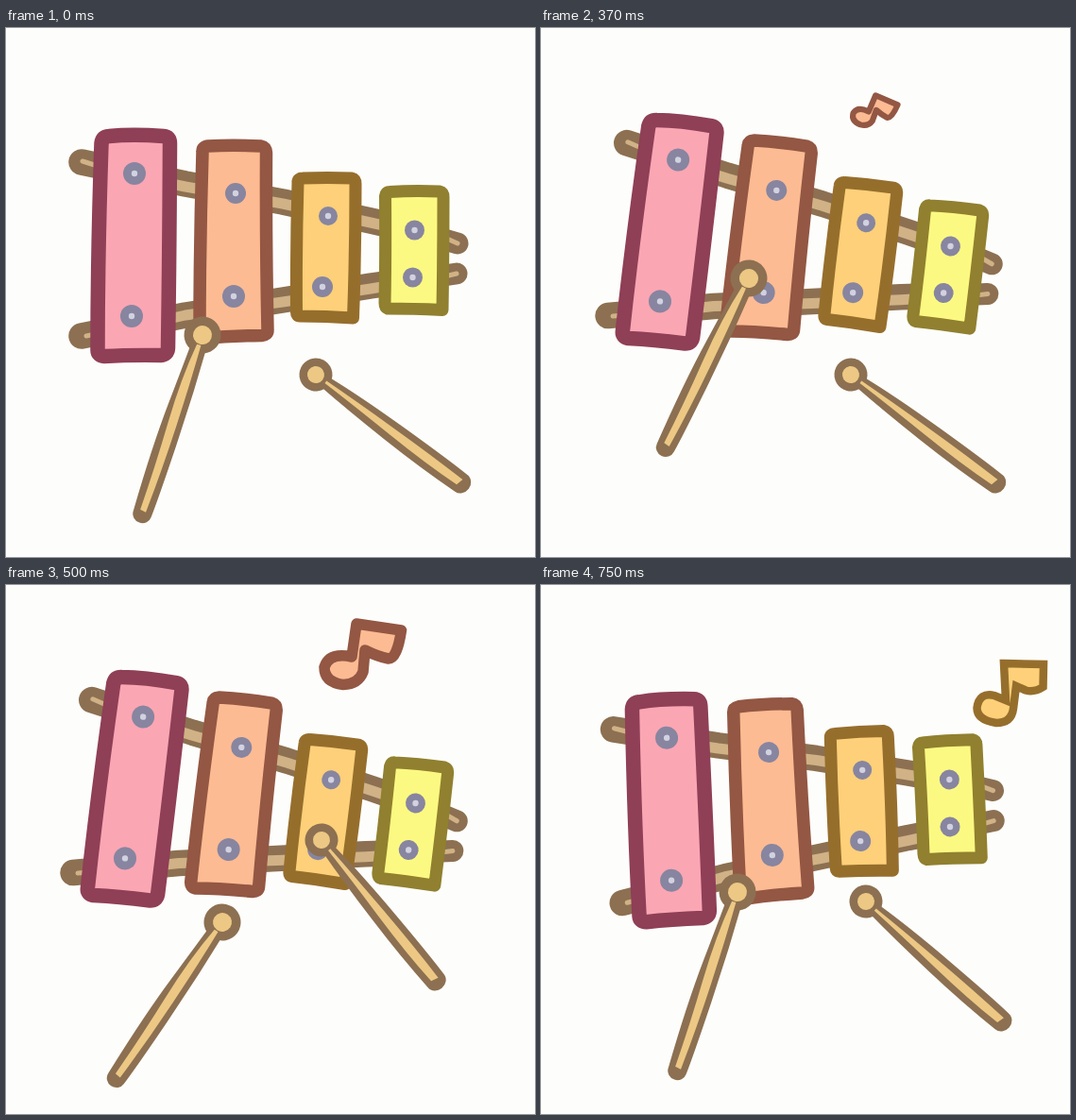
Recreate the animation shown at these times as an HTML page. Size 560 px wide and 560 px high, loop 0.87 s.

```html
<!DOCTYPE html>
<html lang="en">
<head>
<meta charset="utf-8">
<title>Xylophone</title>
<style>
  html, body { margin: 0; height: 100%; overflow: hidden; background: #fdfdfb; }
  svg { display: block; width: 100vw; height: 100vh; stroke-linejoin: round; stroke-linecap: round; }
  .rails { fill: none; stroke: #8c7051; stroke-width: 27.5; }
  .tips { stroke-width: 23; }
  .shine { stroke: #d0b286; stroke-width: 11; }
  .glint { stroke: #d0b286; stroke-width: 5; }
  .wood { fill: #8c7051; }
  .core { fill: #ecc884; }
  .pink { fill: #fba6b3; stroke: #8f3f56; stroke-width: 15.5; }
  .orange { fill: #fdbb93; stroke: #935743; stroke-width: 13.5; }
  .gold { fill: #fdd079; stroke: #966e2c; stroke-width: 13; }
  .yellow { fill: #fcf982; stroke: #90802f; stroke-width: 13; }
</style>
</head>
<body>
<svg viewBox="0 0 560 560">
  <g id="xylo">
    <g class="rails">
      <path d="M80 142L190 165L293 184L386 204L430 214M80 326L190 304L293 288L386 273L430 267"/>
      <path class="tips" d="M430 214L478 228M430 267L477 260"/>
      <path class="shine" d="M150 160L190 168L293 186L386 206L440 218M150 313L190 304L293 290L386 276L440 267"/>
      <path class="glint" d="M81 141L100 147M85 326L100 323M460 220L478 228M460 264L477 260"/>
    </g>
    <path class="pink" d="M101 122Q102 115 109 114.500Q134 112 167 114.500Q173.500 115 173.500 122Q173 240 171.500 339Q171 346 164 346.500Q130 346 104 347.500Q97 347 97 341Q97 240 101 122Z"/>
    <path class="orange" d="M208 131Q208 126 214 125Q240 123.500 270 125Q275 126 275.500 132Q275 230 277 320Q277 325 271 325.500Q235 326 211 328.500Q205 328 205 322Q205 230 208 131Z"/>
    <path class="gold" d="M309 163Q309 159 314 159Q340 158 366 159Q370 160 370 165Q370 240 367.500 307Q338 305 311 305Q307.500 305 307.500 301Q307 230 309 163Z"/>
    <path class="yellow" d="M401.500 178Q402 173.500 406 173.500Q430 172 459 173Q463 174 463 179Q463 240 462 298.500Q430 297 404 297Q401 296 401 291Q402 240 401.500 178Z"/>
    <g id="screws"></g>
  </g>
  <g id="left">
    <path class="wood" d="M0 -8Q60 -11 120 -11T200 -10A9.500 10 0 0 1 200 10Q130 13 80 11T0 8Z"/>
    <circle class="wood" r="19.500"/>
    <circle class="core" r="10"/>
    <path class="core" d="M11 -2Q50 -4 100 -4.500T197 -3L196 3.500Q150 3 100 5T11 2.500Z"/>
  </g>
  <g id="right">
    <path class="wood" d="M10 -6Q50 -10 110 -11T192 -11A10 11 0 0 1 192 11Q150 13 100 11.500T10 7Z"/>
    <circle class="wood" r="17.500"/>
    <circle class="core" r="9"/>
    <path class="core" d="M13 -1.500Q50 -3 100 -4T191 -4L189 4Q150 6 100 4T13 1.500Z"/>
  </g>
  <g id="noteA"><path class="orange" style="stroke-width:11.500" transform="translate(-377 -72)"
    d="M371 41L418.500 48Q414 78 405 78Q394 76 380 69L378 92Q373 105 357 105.500Q337 103 337 87Q342 71 366 76Z"/></g>
  <g id="noteB"><path class="gold" style="stroke-width:8.500;stroke-linejoin:miter" transform="translate(-498 -113)"
    d="M490 83L532 84L531.500 108Q522 114 513 111.500L503 107L500 131Q498 146 482 146Q461.500 143 461.500 130Q464 113 480 117L492 122Z"/></g>
</svg>
<script>
const $ = id => document.getElementById(id);

const screws = [[136, 154, 12], [133, 305, 12], [243, 175, 11], [241, 284, 12],
                [341, 199, 10], [335, 274, 11], [432.5, 214, 10.5], [430.5, 264, 10.5]];
$('screws').innerHTML = screws.map(([x, y, r]) =>
  `<circle cx="${x}" cy="${y}" r="${r}" fill="#8785a0"/><circle cx="${x}" cy="${y}" r="3.2" fill="#d2d1e0"/>`).join('');

const place = (x, y, turn, size = 1) => `translate(${x} ${y}) rotate(${turn}) scale(${size})`;
const hidden = 'scale(0)';

const rest = 'rotate(0)', tiltRight = 'rotate(6.15 275 232)', tiltLeft = 'rotate(-3.04 282 213)';
const leftReady = place(208, 325, 108.6), leftHit = place(220, 265, 116.2), leftBack = place(229, 357, 124.2);
const rightReady = place(328, 367, 36.75), rightHit = place(334, 270, 50.9), rightBack = place(344, 335, 41.4);

const parts = ['xylo', 'left', 'right', 'noteA', 'noteB'].map($);
// Start time in ms, then one pose per part
const poses = [
  [0, rest, leftReady, rightReady, hidden, hidden],
  [250, rest, leftHit, rightReady, hidden, hidden],
  [370, tiltRight, leftHit, rightReady, place(353, 88, 15, 0.53), hidden],
  [500, tiltRight, leftBack, rightHit, place(377, 72, 0), hidden],
  [620, tiltLeft, leftBack, rightHit, place(376, 72, 16, 1.03), place(490, 110, -30, 1.07)],
  [750, tiltLeft, leftReady, rightBack, hidden, place(498, 113, 0)]
];

function draw() {
  const t = performance.now() % 870;
  const [, ...pose] = poses.findLast(p => p[0] <= t);
  parts.forEach((part, i) => part.setAttribute('transform', pose[i]));
  requestAnimationFrame(draw);
}
draw();
</script>
</body>
</html>
```
